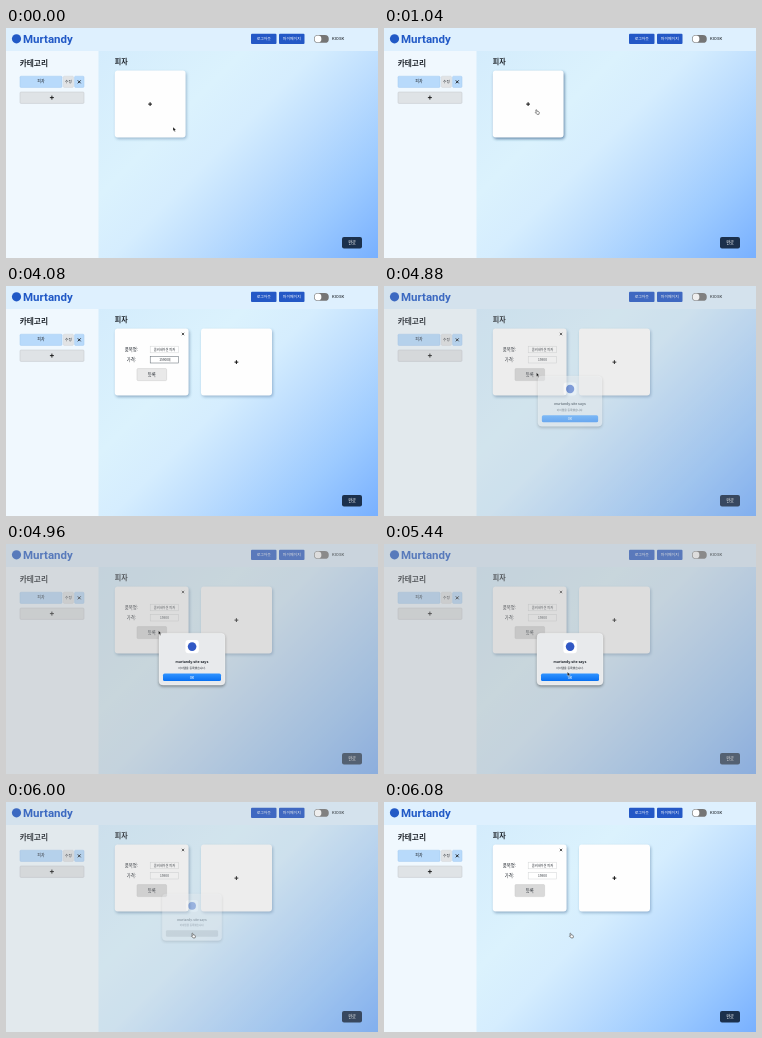
Recreate the animation shown at these times as an HTML page. Size 372 px wide and 230 px high, loop 6.16 s.

```html
<!DOCTYPE html>
<html lang="ko">
<head>
<meta charset="utf-8">
<title>Menu editor</title>
<style>
  html, body { margin: 0; width: 100%; height: 100%; overflow: hidden; }
  svg { display: block; width: 100vw; height: 100vh; }
  text { font-family: "Noto Sans CJK KR", "Noto Sans CJK", "Noto Sans", sans-serif; font-weight: 500; fill: #20262d; }
  .mid { text-anchor: middle; }
  .bold { font-weight: 700; }
  .white { fill: #fff; }
  .latin { font-family: Inter, Roboto, sans-serif; }
  .logo { font-family: Roboto, sans-serif; font-weight: 700; fill: #2159c6; }
  .cross { stroke: #111; fill: none; }
</style>
</head>
<body>
<svg viewBox="0 0 372 230" preserveAspectRatio="none">
  <defs>
    <linearGradient id="sky" gradientUnits="userSpaceOnUse" x1="110" y1="5" x2="354" y2="248">
      <stop offset="0" stop-color="#d4ecfc"/>
      <stop offset=".3" stop-color="#dbf2fd"/>
      <stop offset=".45" stop-color="#d5edfe"/>
      <stop offset=".6" stop-color="#bedefe"/>
      <stop offset=".8" stop-color="#9ccaff"/>
      <stop offset="1" stop-color="#78b0ff"/>
    </linearGradient>
    <linearGradient id="ok" x2="0" y2="1">
      <stop offset="0" stop-color="#2f93ff"/>
      <stop offset="1" stop-color="#0870f2"/>
    </linearGradient>
    <filter id="blur" x="-20%" y="-20%" width="140%" height="140%"><feGaussianBlur stdDeviation="1.6"/></filter>
  </defs>

  <rect width="372" height="230" fill="url(#sky)"/>
  <rect y="23" width="92.5" height="207" fill="#f0f8fe"/>
  <rect width="372" height="23" fill="#def0fe"/>

  <circle cx="10.5" cy="10.8" r="4.6" fill="#2159c6"/>
  <text class="logo" x="17" y="14.7" font-size="11.5">Murtandy</text>
  <g fill="#2458c6">
    <rect x="245" y="5.8" width="25.5" height="10.2" rx="1"/>
    <rect x="273" y="5.8" width="25.5" height="10.2" rx="1"/>
  </g>
  <text class="mid white" x="257.8" y="12.4" font-size="3.9">로그아웃</text>
  <text class="mid white" x="285.8" y="12.4" font-size="3.9">마이페이지</text>
  <rect x="308" y="7" width="14.8" height="7.8" rx="3.9" fill="#757575"/>
  <circle cx="312" cy="10.9" r="3.4" fill="#fff"/>
  <text class="latin" x="326" y="12.4" font-size="4">KIOSK</text>

  <text class="bold" x="13.7" y="38" font-size="7.7">카테고리</text>
  <g stroke-width=".5">
    <rect x="14" y="48.2" width="42" height="11.2" rx="1" fill="#b8dafb" stroke="#a3c9ee"/>
    <rect x="57.4" y="48.2" width="10" height="11.2" rx="1" fill="#e1e3e5" stroke="#cfd3d6"/>
    <rect x="68.6" y="48.2" width="9.4" height="11.2" rx="1" fill="#b8dafb" stroke="#a3c9ee"/>
    <rect x="14" y="64" width="64" height="11.4" rx="1" fill="#dfe3e6" stroke="#c0c5c9"/>
  </g>
  <text class="mid" x="35" y="55.3" font-size="4">피자</text>
  <text class="mid" x="62.4" y="55.2" font-size="3.6">수정</text>
  <path class="cross" stroke-width=".9" d="M71.8 52.4l2.9 2.9m0-2.9l-2.9 2.9M43.9 69.6h4m-2-2v4"/>

  <text class="bold" x="108.7" y="35.6" font-size="7">피자</text>
  <g id="cards"></g>

  <rect x="336" y="209" width="20" height="11.6" rx="2" fill="#1b304c"/>
  <text class="mid white" x="346" y="216.3" font-size="4.2">완료</text>

  <rect id="veil" width="372" height="230" fill="#aaa"/>
  <g id="dialog">
    <rect x="153" y="90.5" width="66" height="52" rx="4" fill="#000" opacity=".4" filter="url(#blur)"/>
    <rect x="153" y="89.3" width="66" height="51.7" rx="4" fill="#e8eaec" stroke="#f6f7f8" stroke-width=".4"/>
    <rect x="179.4" y="96" width="13.4" height="13.2" rx="3" fill="#fff"/>
    <circle cx="186.1" cy="102.6" r="4.3" fill="#3158c4"/>
    <text class="mid latin bold" x="186" y="119" font-size="3.5">murtandy.site says</text>
    <text class="mid" x="186" y="125.2" font-size="2.8">아이템을 등록했습니다.</text>
    <rect id="okBox" x="157" y="129.6" width="58" height="7.4" rx="1.6"/>
    <text id="okText" class="mid latin white" x="186" y="134.5" font-size="3.2">OK</text>
  </g>

  <g id="cursor" stroke-linejoin="round">
    <path id="arrow" d="M0 0v4.1l1-.9.7 1.6.8-.3-.7-1.6h1.3z" fill="#111" stroke="#fff" stroke-width=".35"/>
    <path id="hand" d="M.1.3q.5-.5.9 0l.5 1.4 1.6.4q.6.3.5 1l-.3 1.6H1.2L-.4 3q.2-.8 1 0z" fill="#fff" stroke="#222" stroke-width=".5"/>
    <path id="beam" d="M-.9-2.4h1.8M0-2.4v4.8M-.9 2.4h1.8" fill="none" stroke="#222" stroke-width=".5"/>
  </g>
</svg>
<script>
const LOOP = 6160, STEP = 80;
const $ = id => document.getElementById(id);
const set = (id, attrs) => { for (const k in attrs) $(id).setAttribute(k, attrs[k]); };
const show = (id, on) => set(id, { visibility: on ? 'visible' : 'hidden' });
const ramp = (t, a, b) => Math.min(1, Math.max(0, (t - a) / (b - a)));
const ease = p => p * p * (3 - 2 * p);
const within = (t, a, b) => t >= a && t < b;

const card = (id, x, w) => `
  <rect id="${id}Shadow" x="${x + 1}" y="44" width="${w}" height="67" rx="3" fill="#1d4a78" filter="url(#blur)"/>
  <rect x="${x}" y="42.6" width="${w}" height="67" rx="3" fill="#fefefe"/>`;
const plus = x => `<path class="cross" stroke-width="1" d="M${x - 1.9} 76.1h3.8m-1.9-1.9v3.8"/>`;
const field = (id, y, label) => `
  <text class="mid" x="125.4" y="${y + 5}" font-size="4.4">${label}</text>
  <rect id="${id}Box" x="144.2" y="${y}" width="28.4" height="6.6" fill="#fff" stroke-width=".5"/>
  <text id="${id}" class="mid" x="158.5" y="${y + 4.5}" font-size="3.2"></text>
  <path id="${id}Caret" d="M0 ${y + 1.5}v3.6" stroke="#222" stroke-width=".3"/>`;

$('cards').innerHTML = `
  <g id="single">${card('lone', 108.8, 70.8)}${plus(144.1)}</g>
  <g id="pair">${card('form', 108.8, 73.8)}${card('add', 195, 71)}${plus(230.4)}
    <path class="cross" stroke-width=".7" d="M175.8 46.8l2.4 2.4m0-2.4l-2.4 2.4"/>
    ${field('item', 60.2, '품목명:')}${field('price', 70.4, '가격:')}
    <rect id="submit" x="131" y="82.6" width="29.6" height="12" rx="1" stroke="#c9c9c9" stroke-width=".5"/>
    <text class="mid" x="145.7" y="90.2" font-size="4.4">등록</text>
  </g>`;

const itemKeys = ['', '코', '콤', '콤비', '콤비네', '콤비네이', '콤비네잇', '콤비네이셔',
  '콤비네이션', '콤비네이션 ', '콤비네이션 피', '콤비네이션 피자'];
const priceKeys = ['', '1', '15', '159', '1590', '15900', '159000', '159000', '15900'];
const typed = (keys, t, start, gap) =>
  keys[Math.min(keys.length - 1, Math.max(0, Math.floor((t - start) / gap) + 1))];

const path = [[0, 167, 99], [80, 166.6, 98.4], [800, 151.7, 81.6], [1360, 151.7, 81.6],
  [1760, 158, 64], [3280, 158, 64], [3520, 158, 74], [4160, 158, 74],
  [4560, 152.4, 86.6], [5040, 152.4, 86.6], [5520, 185.8, 131.2], [LOOP, 185.8, 131.2]];

function cursorAt(t) {
  const i = path.findIndex(p => p[0] > t);
  const [t0, x0, y0] = path[i - 1], [t1, x1, y1] = path[i];
  const p = ease(ramp(t, t0, t1));
  return [x0 + (x1 - x0) * p, y0 + (y1 - y0) * p];
}

function fill(id, text, focused, t) {
  $(id).textContent = text;
  set(id + 'Box', { stroke: focused ? '#59636b' : '#d2d4d6' });
  set(id + 'Caret', { transform: `translate(${158.7 + $(id).getComputedTextLength() / 2} 0)` });
  show(id + 'Caret', focused && t % 1000 < 500);
}

function render(t) {
  const formOpen = t >= 1360;
  set('single', { display: formOpen ? 'none' : 'inline' });
  set('pair', { display: formOpen ? 'inline' : 'none' });
  set('loneShadow', { opacity: .34 + .3 * ramp(t, 80, 400) });
  set('formShadow', { opacity: .42 });
  set('addShadow', { opacity: .34 });

  if (formOpen) {
    fill('item', typed(itemKeys, t, 2000, 96), within(t, 1840, 3520), t);
    fill('price', typed(priceKeys, t, 3600, 80), within(t, 3520, 4880), t);
  }
  set('submit', { fill: t >= 4480 ? '#d9d9d9' : '#e9e9e9' });

  const open = ramp(t, 4800, 4960), close = ramp(t, 5840, 6080);
  set('veil', { opacity: .4 * open * (1 - ramp(t, 5920, 6080)) });
  const s = (.94 + .06 * open) * (1 - .15 * close);
  set('dialog', {
    opacity: open * (1 - close),
    transform: `translate(186 115.2) scale(${s}) translate(-186 -115.2)`
  });
  const pressed = t >= 5760;
  set('okBox', { fill: pressed ? '#b4b6b8' : 'url(#ok)' });
  show('okText', !pressed);

  const [x, y] = cursorAt(t);
  const hidden = within(t, 2000, 3280) || within(t, 3600, 4160);
  const kind = within(t, 640, 1360) || t >= 5520 ? 'hand'
    : within(t, 1680, 2000) || within(t, 3280, 4320) ? 'beam' : 'arrow';
  set('cursor', { transform: `translate(${x} ${y})`, display: hidden ? 'none' : 'inline' });
  for (const k of ['arrow', 'hand', 'beam']) show(k, k === kind);
}

const start = performance.now();
function tick() {
  const t = (performance.now() - start) % LOOP;
  render(Math.floor(t / STEP) * STEP);
  requestAnimationFrame(tick);
}
tick();
</script>
</body>
</html>
```
